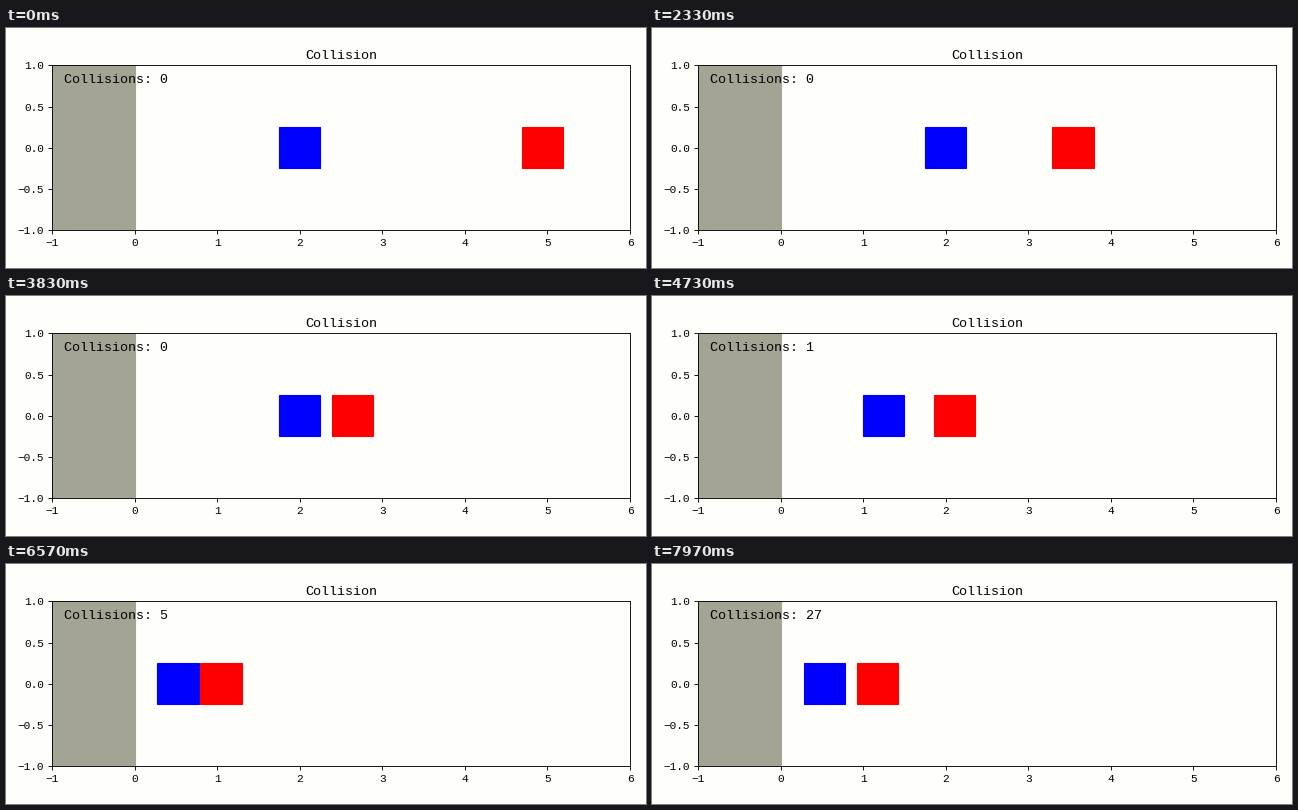
Write a matplotlib script that moves like this. It is 640 px wide and 240 px high and loops after 8 s.

```python
import matplotlib.pyplot as plt
from matplotlib.animation import FuncAnimation
from matplotlib.patches import Rectangle

W, H, DPI = 640, 240, 80
LOOP_MS = 8000
STEPS = 240
TICKS = 2 * STEPS  # two ticks per step, so each step starts between ticks
SIZE = 0.5
MASS_A, MASS_B = 1, 100

plt.rcParams.update({
    "font.family": "Liberation Mono",
    "font.size": 10,
    "axes.titlesize": 12,
})


def bounce(va, vb):
    """Velocities after an elastic hit between the two blocks."""
    total = MASS_A + MASS_B
    diff = MASS_A - MASS_B
    return ((diff * va + 2 * MASS_B * vb) / total,
            (2 * MASS_A * va - diff * vb) / total)


def simulate(n):
    """Left edges of both blocks and the hit count for every step."""
    a, b = 2 - SIZE / 2, 4.94 - SIZE / 2
    va, vb = 0.0, -0.02
    hits = 0
    states = [(a, b, hits)]
    for _ in range(n - 1):
        a += va
        b += vb
        if a < 0:
            a, va = 0.0, -va
            hits += 1
        if b - a < SIZE - 1e-9:
            va, vb = bounce(va, vb)
            hits += 1
        states.append((a, b, hits))
    return states


states = simulate(STEPS)

fig = plt.figure(figsize=(W / DPI, H / DPI), dpi=DPI, facecolor="#fefefa")
ax = fig.add_axes([46 / W, 37.6 / H, 578 / W, 165.14 / H],
                  facecolor="#fefefa")
ax.set_xlim(-1, 6)
ax.set_ylim(-1, 1)
ax.set_xticks(range(-1, 7))
ax.set_yticks([-1, -0.5, 0, 0.5, 1])
ax.set_title("Collision")


def add_box(x, y, width, height, color):
    return ax.add_patch(Rectangle((x, y), width, height, color=color))


add_box(-1, -1, 1, 2, "#a4a494")
block_a = add_box(states[0][0], -SIZE / 2, SIZE, SIZE, "blue")
block_b = add_box(states[0][1], -SIZE / 2, SIZE, SIZE, "red")
label = ax.text(0.02, 0.894, "", fontsize=12, transform=ax.transAxes)


def update(tick):
    a, b, hits = states[min((tick + 1) // 2, STEPS - 1)]
    block_a.set_x(a)
    block_b.set_x(b)
    label.set_text(f"Collisions: {hits}")
    return block_a, block_b, label


anim = FuncAnimation(fig, update, frames=TICKS, interval=LOOP_MS / TICKS,
                     init_func=lambda: update(0), repeat=True, repeat_delay=0)
plt.show()
```
